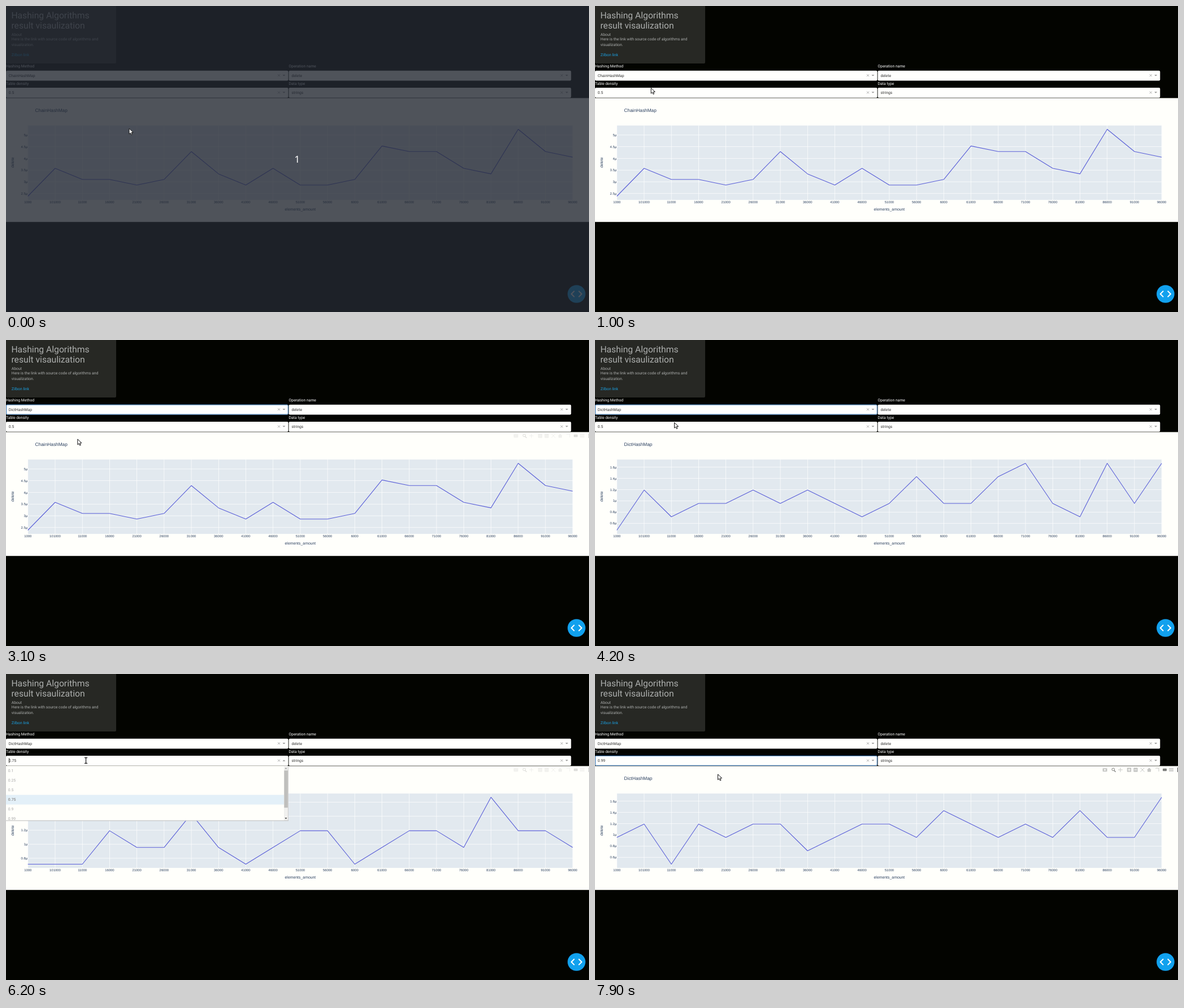
Recreate the animation shown at these times as an HTML page with a canvas. Size 1032 by 543 pixels, loop 8000 ms.

```html
<!DOCTYPE html>
<html lang="en">
<head>
<meta charset="utf-8">
<title>Hashing dashboard</title>
<style>
  html, body { margin: 0; width: 100%; height: 100%; overflow: hidden; background: #030400; }
  canvas { display: block; }
</style>
</head>
<body>
<canvas id="stage" width="1032" height="543"></canvas>
<script>
const c = document.getElementById('stage').getContext('2d');
const LOOP = 8000, STEP = 100, LOAD_DELAY = 200;
const UI = 'Roboto, sans-serif', PLOT = '"Liberation Sans", Arial, sans-serif';
const PAPER = '#fffffb', INK = '#2a3f5f', ROW = 17.1, MENU_H = 97, CHART_TOP = 163.4;

// Timings were taken with a clock that ticks every 2^-22 s; samples count its ticks.
const QUANTUM = 1e6 / 2 ** 22;
const choices = [
  { at: 0, method: 'ChainHashMap', density: '0.5', samples: [10,15,13,13,12,13,18,14,12,15,12,12,13,19,18,18,15,14,22,18,17] },
  { at: 3100, method: 'DictHashMap', density: '0.5', samples: [2,5,3,4,4,5,4,5,4,3,4,6,4,4,6,7,4,3,7,4,7] },
  { at: 5300, method: 'DictHashMap', density: '0.75', samples: [3,3,3,5,4,4,6,4,3,4,5,5,3,4,5,5,4,7,5,5,4] },
  { at: 7700, method: 'DictHashMap', density: '0.99', samples: [4,5,2,5,4,5,5,3,4,5,5,4,6,5,4,5,4,6,4,4,7] }
];
// Element counts are sorted as text, not as numbers.
const categories = Array.from({ length: 21 }, (_, i) => String(1000 + 5000 * i)).sort();

const methods = ['ChainHashMap', 'OpenHashMap', 'DictHashMap', 'LinearHashMap', 'DoubleHashMap', 'CuckooHashMap'];
const densities = ['0.1', '0.25', '0.5', '0.75', '0.9', '0.99', 'all'];
const menus = [
  { open: 1800, close: 3100, key: 'method', top: 132.9, rows: methods },
  { open: 4400, close: 5300, key: 'density', top: 163.2, rows: densities },
  { open: 6100, close: 7700, key: 'density', top: 163.2, rows: densities, scrollAt: 6800 }
];
const moves = [
  { from: 100, to: 1000, x: 98.7, y: 145 },
  { from: 1000, to: 1600, x: 118, y: 129 },
  { from: 2200, to: 2800, x: 126.3, y: 175.5 },
  { from: 3500, to: 4200, x: 140, y: 146 },
  { from: 4400, to: 4900, x: 133, y: 221 },
  { from: 5800, to: 6100, x: 141.5, y: 153.5 },
  { from: 6200, to: 6700, x: 115.5, y: 238.5 },
  { from: 7700, to: 7900, x: 217, y: 177.5 }
];

const clamp = v => Math.max(0, Math.min(1, v));
const choiceAt = t => choices.findLast(s => s.at <= Math.max(0, t));
const menuAt = t => menus.find(m => t >= m.open && t < m.close);

function pointerAt(t) {
  let x = 217.5, y = 217;
  for (const m of moves) {
    const k = clamp((t - m.from) / (m.to - m.from));
    x += (m.x - x) * k;
    y += (m.y - y) * k;
  }
  return { x, y };
}

function rect(x, y, w, h, color) { c.fillStyle = color; c.fillRect(x, y, w, h); }

function box(x, y, w, h, r, fill, stroke) {
  c.beginPath(); c.roundRect(x, y, w, h, r);
  if (fill) { c.fillStyle = fill; c.fill(); }
  if (stroke) { c.strokeStyle = stroke; c.lineWidth = 1; c.stroke(); }
}

function shape(points, fill, stroke, width = 1) {
  c.beginPath();
  points.forEach(p => c.lineTo(...p));
  if (fill) { c.closePath(); c.fillStyle = fill; c.fill(); }
  if (stroke) { c.strokeStyle = stroke; c.lineWidth = width; c.stroke(); }
}

const line = (x1, y1, x2, y2, color, width) => shape([[x1, y1], [x2, y2]], null, color, width);
const triangle = (x, y, w, h, color) => shape([[x - w, y - h], [x + w, y - h], [x, y + h]], color);

function cross(x, y, r, color, width) {
  line(x - r, y - r, x + r, y + r, color, width);
  line(x + r, y - r, x - r, y + r, color, width);
}

// y is the middle of the capital letters.
function text(s, x, y, color, { size = 6.83, family = UI, align = 'left', weight = 400 } = {}) {
  c.font = `${weight} ${size}px ${family}`;
  c.textAlign = align;
  c.fillStyle = color;
  c.fillText(s, x, y + size * .355);
}

function select(x, y, label, value, open, focused) {
  text(label, x, y - 16.2, '#fff');
  box(x, y - 8.4, 499.7, 17.6, 2, '#fffffd');
  if (focused) box(x + .5, y - 8.2, 498.8, 17, 2, null, '#2d70b3');
  text(value, x + 4.8, y, '#333');
  cross(x + 483.1, y, 2, '#999', .8);
  triangle(x + 492, y, 2.5, open ? -1.3 : 1.3, '#999');
}

function drawChart({ method, samples }) {
  const left = 38.7, right = 1003.1, top = 212.1, bottom = 344.1;
  const low = Math.min(...samples) * QUANTUM, high = Math.max(...samples) * QUANTUM;
  const xAt = i => left + (right - left) * i / (samples.length - 1);
  const yAt = v => bottom - (bottom - top) * (.05 + .9 * (v - low) / (high - low));
  const tick = { size: 5.9, family: PLOT }, title = { size: 6.9, family: PLOT, align: 'center' };

  rect(0, CHART_TOP, 1032, 219.8, PAPER);
  rect(left, top, right - left, bottom - top, '#e2e9ef');
  text(method, 51.6, 184.6, INK, { size: 8.3, family: PLOT });
  categories.forEach((name, i) => {
    rect(xAt(i) - .3, top, .7, bottom - top, '#fff');
    text(name, xAt(i), 348.2, INK, { ...tick, align: 'center' });
  });
  const step = high - low > 2 ? .5 : .2;
  for (let v = Math.ceil(low / step) * step; v < high; v += step) {
    rect(left, yAt(v) - .3, right - left, .7, '#fff');
    text(+v.toFixed(1) + 'µ', 38.2, yAt(v), INK, { ...tick, align: 'right' });
  }
  c.lineJoin = 'round';
  shape(samples.map((v, i) => [xAt(i), yAt(v * QUANTUM)]), null, '#5a5fd8', 1.1);
  text('elements_amount', (left + right) / 2, 360.8, INK, title);
  c.save();
  c.translate(12, 277.7);
  c.rotate(-Math.PI / 2);
  text('delete', 0, 0, INK, title);
  c.restore();
}

function drawModebar(opacity) {
  const pale = '#c7c8c6', dark = '#7c7d7b', y = 170;
  c.save();
  c.globalAlpha = opacity;
  box(898.6, y - 2.8, 8, 6, 1, pale);
  box(901.2, y - 1.2, 2.8, 2.8, 1.4, PAPER);
  box(915, y - 3, 4.6, 4.6, 2.3, null, dark);
  line(919, y + 1.2, 921.6, y + 3.8, dark, 1.3);
  line(926, y, 934, y, pale);
  line(930, y - 4, 930, y + 4, pale);
  for (const x of [945.5, 957]) {
    box(x - 3.7, y - 3.7, 7.4, 7.4, .8, pale);
    line(x - 2.3, y, x + 2.3, y, PAPER);
  }
  line(945.5, y - 2.3, 945.5, y + 2.3, PAPER);
  cross(969, y, 3.6, pale);
  triangle(981, y - 1.8, 4, -2, pale);
  rect(978, y, 6, 3.6, pale);
  line(992, y - 3, 998, y - 3, pale);
  line(998, y - 3, 998, y + 3, pale);
  box(1005, y - 2.2, 7, 4.4, 1, dark);
  rect(1016, y - 2.7, 8, 2.2, pale);
  rect(1016, y + .6, 8, 2.2, pale);
  rect(1031, y - 4, 1, 8, '#444');
  c.restore();
}

function drawMenu({ top, rows, key, open, scrollAt }, t) {
  const scroll = scrollAt ? 22.4 * clamp((t - scrollAt) / 400) : 0;
  const selected = rows.indexOf(choiceAt(t)[key]), end = top + MENU_H;
  // Scrolling carries the highlight along, so the row depends on the pointer alone.
  const hover = Math.floor((pointerAt(t).y - top) / ROW), hot = hover < 0 ? selected : hover;
  rect(0, top, 500, MENU_H, PAPER);
  c.save();
  c.beginPath(); c.rect(0, top, 492, MENU_H); c.clip();
  rows.forEach((name, i) => {
    const y = top + i * ROW - scroll, chosen = i === selected;
    if (i === hot) rect(0, y, 492, ROW, '#e3f0f8');
    text(name, 3.8, y + ROW / 2 - .2, chosen ? '#949494' : '#a8a8a8', { weight: chosen ? 700 : 400 });
  });
  c.restore();
  rect(492, top, 7.5, MENU_H, '#f0f0ee');
  rect(492.4, top + 8 + scroll * .67, 6.4, 66, '#bfbfbd');
  triangle(495.5, top + 4, 2, -1.2, scroll ? '#444' : '#999');
  triangle(495.5, end - 4, 2, 1.2, scroll > 22 ? '#999' : '#444');
  rect(0, end - .5, 500, 1, '#bbb');
  rect(499.3, top, .7, MENU_H, '#bbb');
  if ((t - open) % 1000 < 500) rect(5, top - 13.9, .9, 8.4, '#111');
}

function drawPointer({ x, y }, ibeam) {
  c.save();
  c.translate(x, y);
  if (ibeam) {
    for (const [color, width] of [['#fff', 2.4], ['#111', 1.2]]) {
      line(0, -5, 0, 5, color, width);
      for (const end of [-5, 5]) line(-2.6, end, 2.6, end, color, width);
    }
  } else {
    const arrow = [[.5, .5], [.5, 10.2], [2.8, 8.2], [4.4, 11.6], [6, 10.9], [4.5, 7.5], [7.6, 7.3], [.5, .5]];
    shape(arrow, '#fff', '#111');
  }
  c.restore();
}

function drawHeader() {
  const grey = '#adafae';
  box(0, -4, 195, 106, 2, '#272824');
  ['Hashing Algorithms', 'result visaulization'].forEach((s, i) => text(s, 9.4, 16 + 18.4 * i, grey, { size: 15.7 }));
  text('About', 9.8, 50.2, grey);
  text('Here is the link with source code of algorithms and', 9.8, 59, grey);
  text('visualization.', 9.8, 69, grey);
  text('Zilbon link', 9.8, 86.8, '#1b9fe0');
}

function drawButton() {
  const x = 1009.9, y = 511;
  box(x - 15.8, y - 15.8, 31.6, 31.6, 15.8, '#11a1ee');
  for (const side of [-1, 1])
    shape([[x + side * 3.8, y - 5.4], [x + side * 9.1, y], [x + side * 3.8, y + 5.4]], null, '#fff', 2);
}

function render(t) {
  const menu = menuAt(t), choice = choiceAt(t), pointer = pointerAt(t);
  const touched = !menu && choice.at > 0;
  const overChart = time => time >= STEP && !menuAt(time) && pointerAt(time).y > CHART_TOP;

  rect(0, 0, 1032, 543, '#030400');
  drawHeader();
  select(0, 123.2, 'Hashing Method', choice.method, menu?.key === 'method', touched && choice.density === '0.5');
  select(500.6, 123.2, 'Operation name', 'delete');
  select(0, 153.5, 'Table density', choice.density, menu?.key === 'density', touched && choice.density !== '0.5');
  select(500.6, 153.5, 'Data type', 'strings');
  drawChart(choiceAt(t - LOAD_DELAY));
  // The toolbar fades with the share of the last 200 ms spent over the chart.
  drawModebar([0, 1, 2, 3].filter(i => overChart(t - 50 * i)).length / 4);
  if (menu) drawMenu(menu, t);
  drawButton();
  if (t < STEP) {
    rect(0, 0, 1032, 543, 'rgba(36,40,51,.8)');
    text('1', 515.3, 271.8, '#fff', { size: 17, family: '"Noto Sans", sans-serif', align: 'center' });
  }
  drawPointer(pointer, menu && pointer.y < menu.top);
}

c.textRendering = 'geometricPrecision';
const start = performance.now();
function tick(now) {
  const t = Math.max(0, now - start) % LOOP;
  render(Math.floor(t / STEP) * STEP);
  requestAnimationFrame(tick);
}
tick(start);
</script>
</body>
</html>
```
